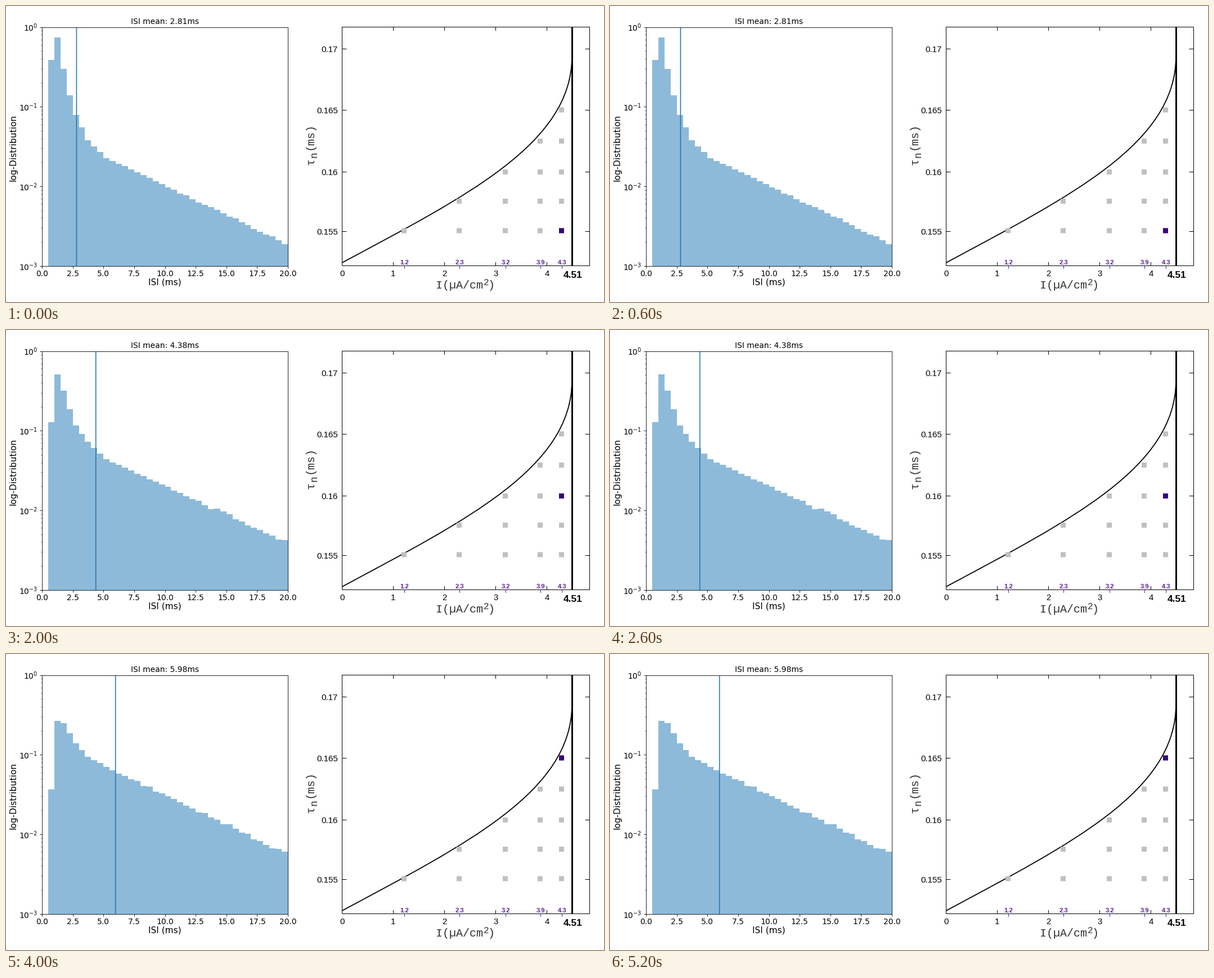
A matplotlib script for the animation above (6000 ms loop, 1063 px wide and 527 px high).

```python
import numpy as np
import matplotlib.pyplot as plt
from matplotlib.animation import FuncAnimation
from matplotlib.patches import PathPatch, Rectangle
from matplotlib.path import Path

W, H, DPI = 1063, 527, 72  # at 72 dpi one point is one pixel
BLUE, GREY, PURPLE, INDIGO = "#1f77b4", "#c0c0c0", "#5a1ea0", "#380082"
SANS, MONO = "Liberation Sans", "Liberation Mono"

MEANS = [2.81, 3.54, 4.38, 5.17, 5.98]
TOP, DECADE = 37.5, 425 / 3
BINS = np.arange(39)
EDGES = np.arange(0.5, 20.1, 0.5)

# Bar tops at a few bins for the first, middle and last state;
# a parabola over the state number joins them.
KEY_BINS = [0, 1, 2, 3, 4, 6, 9, 20, 38]
PROFILES = [[96, 56, 112, 159, 194, 238, 271, 327, 422],
            [164, 79, 108, 141, 169, 199, 230, 285, 376],
            [241, 119, 123, 141, 159, 183, 201, 259, 354]]
BEND, SLOPE, START = np.polyfit([0, 2, 4], PROFILES, 2)


def densities(state):
    keys = START + SLOPE * state + BEND * state ** 2
    tops = np.interp(BINS, KEY_BINS, keys)
    # rare long intervals are counted less exactly
    noise = np.random.default_rng(state).normal(size=BINS.size) * BINS * 0.06
    return 10 ** ((TOP - tops - noise) / DECADE)


fig = plt.figure(figsize=(W / DPI, H / DPI), dpi=DPI, facecolor="white")
stage = fig.add_axes([0, 0, 1, 1])
stage.set(xlim=(0, W), ylim=(H, 0))
stage.axis("off")


def label(x, y, text, size, font=SANS, **kw):
    """Text whose capitals are centred on y."""
    kw = {"ha": "center", **kw}
    return stage.text(x, y + 0.355 * size, text, fontsize=size, family=font,
                      va="baseline", **kw)


def upright(x, y, text, size, font, **kw):
    """Text turned to read upwards, with its baseline at x."""
    stage.text(x, y, text, fontsize=size, family=font, rotation=90,
               rotation_mode="anchor", ha="center", va="baseline", **kw)


def line(xs, ys, width=1, color="black"):
    stage.plot(xs, ys, color=color, lw=width, solid_capstyle="butt",
               snap=False)


def square(x, y, color):
    patch = Rectangle((x - 4.5, y - 4.5), 9, 9, color=color, lw=0, zorder=3,
                      snap=False)
    return stage.add_patch(patch)


# Histogram
hist = fig.add_axes([64 / W, 64.3 / H, 437 / W, 425 / H])
hist.set_yscale("log")
hist.set(xlim=(0, 20), ylim=(1e-3, 1), xticks=np.arange(0, 20.1, 2.5))
hist.xaxis.set_major_formatter("{x:.1f}")
hist.tick_params(labelsize=13.9, length=3.7, width=0.85, pad=3.7)
hist.tick_params(which="minor", length=2.1, width=0.65)
for spine in hist.spines.values():
    spine.set_linewidth(0.85)
bars = hist.stairs(densities(0), EDGES, baseline=1e-3, fill=True,
                   color=BLUE, alpha=0.5, lw=0)
mean_line = hist.axvline(MEANS[0], color=BLUE, lw=1.6, snap=False)
title = label(282.5, 27, "", 13.9, "DejaVu Sans")
label(282.5, 491, "ISI (ms)", 15.4, "DejaVu Sans")
upright(18, 252, "log-Distribution", 15.4, "DejaVu Sans")

# Parameter plane
LEFT, RIGHT, CEILING, FLOOR = 597.5, 1037.5, 37.5, 462.5
CURRENTS = [1.2, 2.3, 3.2, 3.9, 4.3]
COLUMNS = [707.5, 805.5, 887.5, 949.5, 987.5]
ROWS = [400, 347.5, 295.5, 240.5, 185]
stage.add_patch(Rectangle((LEFT, CEILING), RIGHT - LEFT, FLOOR - CEILING,
                          fill=False, lw=1, snap=False))

for n in range(5):
    x = LEFT + 91 * n
    label(x, 476, str(n), 15)
    if n:
        line([x, x], [CEILING, CEILING + 6.5])
        line([x, x], [FLOOR - 6.5, FLOOR])
for y, text in zip([76.5, 185.5, 295.5, 401.5],
                   ["0.17", "0.165", "0.16", "0.155"]):
    label(589.8, y, text, 15, ha="right")
    line([LEFT, LEFT + 8], [y, y])
    line([RIGHT - 8, RIGHT], [y, y])

# the boundary bends upwards until it touches the limiting current
LIMIT = 1006.5
boundary = Path([(LEFT, 457), (817, 339), (LIMIT - 0.5, 245),
                 (LIMIT - 0.5, 90)], [Path.MOVETO] + [Path.CURVE4] * 3)
stage.add_patch(PathPatch(boundary, fill=False, lw=1.8))
line([LIMIT, LIMIT], [CEILING, FLOOR], 3)
label(1007.5, 478, "4.51", 17.3, weight="bold")

for x, current in zip(COLUMNS, CURRENTS):
    label(x + 1, 455.7, str(current), 11.3, color=PURPLE, weight="bold")
    line([x + 1, x + 1], [463, 468], color=PURPLE)

INK = "#303030"
label(764, 496.3, "I(\u00b5A/cm", 20, MONO, ha="left", color=INK)
label(853.5, 491, "2", 16, MONO, color=INK)
label(862.5, 496.3, ")", 20, MONO, color=INK)
upright(548, 277, "\u03c4", 20, MONO, color=INK)
upright(552, 265, "n", 18, MONO, color=INK)
upright(546, 232, "(ms)", 20, MONO, color=INK)

for i, y in enumerate(ROWS):
    for x in COLUMNS[i:]:
        square(x, y, GREY)
marker = square(COLUMNS[-1], ROWS[0], INDIGO)


def update(second):
    state = min(second, len(MEANS) - 1)  # the last state is held twice as long
    bars.set_data(values=densities(state))
    mean_line.set_xdata([MEANS[state]] * 2)
    title.set_text(f"ISI mean: {MEANS[state]:.2f}ms")
    marker.set_y(ROWS[state] - 4.5)
    return bars, mean_line, title, marker


anim = FuncAnimation(fig, update, frames=6, interval=1000, repeat=True,
                     repeat_delay=0, blit=False)
plt.show()
```
